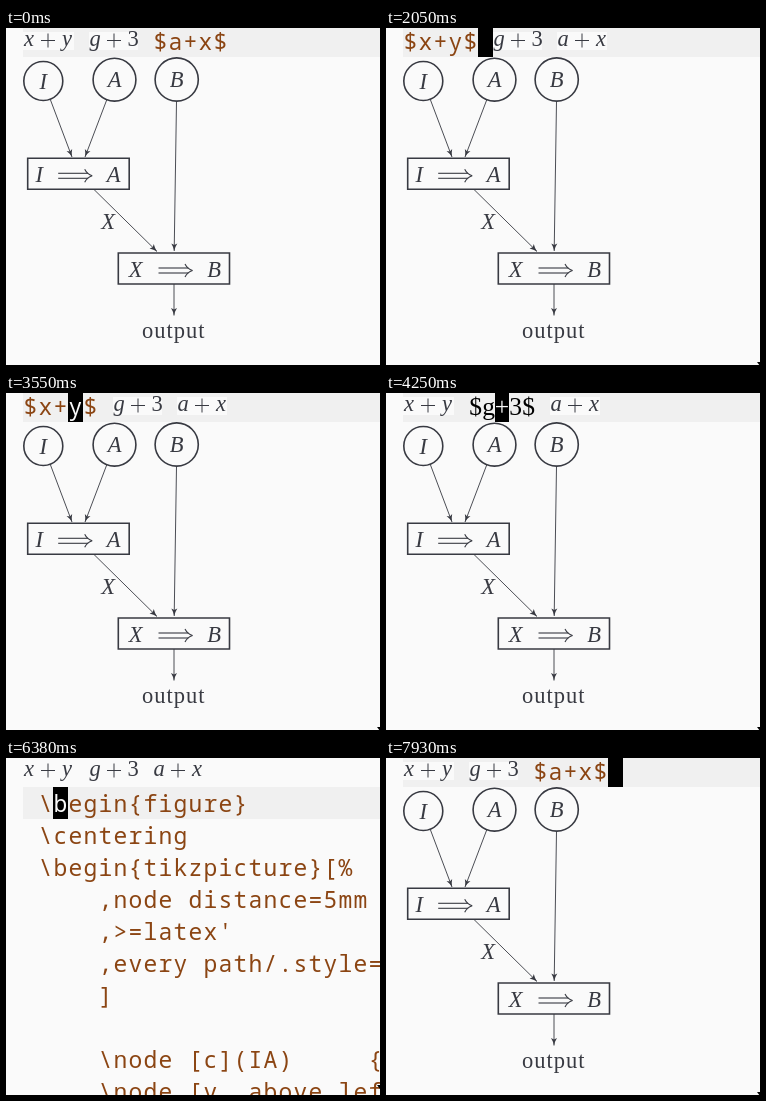
Animation of 374 by 337 pixels, one loop 8000 ms. Source, as an HTML page with a canvas:

```html
<!DOCTYPE html>
<html lang="en">
<head>
<meta charset="utf-8">
<style>
html, body { margin: 0; width: 100%; height: 100%; overflow: hidden; background: #fafafa; }
canvas { display: block; }
</style>
</head>
<body>
<canvas id="stage" width="374" height="337"></canvas>
<script>
const ctx = document.getElementById('stage').getContext('2d');
const LOOP = 8000, LEFT = 17, CELL = 15, ROW = 32;
const BG = '#fafafa', INK = '#383a42', CODE = '#8b4513', ACTIVE = '#f0f0f0';
const MONO = '300 23px "Noto Sans Mono", monospace';
const SERIF = '25.5px "Liberation Serif", serif';
const DIGIT = '22.5px "Liberation Serif", serif';
const MATH = 'italic ' + DIGIT;
const FORMULAS = [['x+y', 51], ['g+3', 49], ['a+x', 50]];
const FIGURE = 3, RENDER_LAG = 50;
const ABOVE = -1, NEXT_LINE = 18;
const LISTING = [
  '\\begin{figure}', '\\centering', '\\begin{tikzpicture}[%',
  '    ,node distance=5mm', "    ,>=latex'", '    ,every path/.style=', '    ]', '',
  '    \\node [c](IA)     {', '    \\node [v, above left'
];

// Turning points of the cursor [time, column]; it steps evenly between them.
// Each formula takes 6 columns, its trailing space included.
const KEYS = [
  [0, 12], [880, 11], [1420, 8], [2710, 0], [2930, ABOVE], [3110, 0], [4250, 8],
  [5460, 16], [5640, 17], [5820, NEXT_LINE], [6140, 19], [6380, 20], [6740, 22],
  [7280, 19], [7470, NEXT_LINE], [7880, 17], [LOOP, 17]
];

function cursorAt(t) {
  const i = KEYS.findIndex(k => k[0] > t);
  const [t0, c0] = KEYS[i - 1], [t1, c1] = KEYS[i];
  const steps = Math.floor(Math.abs(c1 - c0) * (t - t0) / (t1 - t0));
  return c0 + Math.sign(c1 - c0) * steps;
}

// The fragment under the cursor is shown as source, a moment after the move.
const openAt = t => Math.min(FIGURE, Math.floor(cursorAt(Math.max(0, t - RENDER_LAG)) / 6));

function box(x, y, w, h, color) {
  ctx.fillStyle = color;
  ctx.fillRect(x, y, w, h);
}

function write(text, x, y, font, color, align = 'left') {
  ctx.font = font;
  ctx.fillStyle = color;
  ctx.textAlign = align;
  ctx.fillText(text, x, y);
}

function stroke(width, path) {
  ctx.strokeStyle = INK;
  ctx.lineWidth = width;
  ctx.beginPath();
  path();
  ctx.stroke();
}

function line(x1, y1, x2, y2, width = 1) {
  stroke(width, () => { ctx.moveTo(x1, y1); ctx.lineTo(x2, y2); });
}

const letter = (s, x, y, font = MATH) => write(s, x, y, font, INK, 'center');

const caret = (x, row, w = CELL) => box(x, row * ROW - 3, w, ROW, '#000');

// Writes text cell by cell with a block cursor at index `at`; returns the end.
function source(text, x, row, at, serif = false) {
  for (const [i, ch] of [...text].entries()) {
    ctx.font = SERIF;
    const w = serif ? Math.round(ctx.measureText(ch).width) : CELL;
    if (i === at) caret(x, row, w);
    const color = i === at ? BG : serif ? '#000' : CODE;
    write(ch, x + w / 2, 22 + row * ROW, serif ? SERIF : MONO, color, 'center');
    x += w;
  }
  return x;
}

function formula(text, x, w) {
  box(x, 4, w, 18, BG);
  [...text].forEach((ch, i) => {
    const cx = x + 6 + 19 * i;
    if (ch === '+') {
      line(cx - 7, 12.5, cx + 7, 12.5);
      line(cx, 5.5, cx, 19.5);
    } else {
      letter(ch, cx, 18, ch === '3' ? DIGIT : MATH);
    }
  });
  return x + w;
}

function topLine(open, cursor) {
  let x = LEFT;
  FORMULAS.forEach(([text, w], i) => {
    const at = cursor - i * 6;
    x = open === i ? source(`$${text}$`, x, 0, at, i === 1) : formula(text, x, w);
    if (at === 5) caret(x, 0);
    x += CELL;
  });
}

function listing(cursor) {
  LISTING.forEach((text, i) => source(' ' + text, LEFT, i + 1, i ? -1 : cursor - NEXT_LINE));
}

function edge(x1, y1, x2, y2) {
  line(x1, y1, x2, y2, .9);
  ctx.save();
  ctx.translate(x2, y2);
  ctx.rotate(Math.atan2(y2 - y1, x2 - x1));
  ctx.fillStyle = INK;
  ctx.beginPath();
  ctx.moveTo(0, 0);
  ctx.quadraticCurveTo(-4, -.8, -7.5, -3);
  ctx.lineTo(-6, 0);
  ctx.lineTo(-7.5, 3);
  ctx.quadraticCurveTo(-4, .8, 0, 0);
  ctx.fill();
  ctx.restore();
}

function circle(name, x, y, r) {
  stroke(1.6, () => ctx.arc(x, y, r, 0, Math.PI * 2));
  letter(name, x, y + 7.5);
}

function rule(from, to, x, y, w) {
  const a = x + w - 71, c = y + 17.5;
  stroke(1.6, () => ctx.rect(x, y, w, 31));
  letter(from, a - 23 + 4 * (from === 'I'), y + 24);
  letter(to, x + w - 15.5, y + 24);
  for (const side of [-1, 1]) {
    line(a, c + side * 2.5, a + 30, c + side * 2.5, 1.1);
    stroke(1.1, () => {
      ctx.moveTo(a + 26.5, c + side * 6.5);
      ctx.quadraticCurveTo(a + 29, c + side * 1.5, a + 34, c);
    });
  }
}

function figure() {
  circle('I', 37.3, 53, 19.5);
  circle('A', 108.5, 51.7, 21.4);
  circle('B', 170.7, 51.5, 21.6);
  rule('I', 'A', 21.7, 130.3, 101.5);
  rule('X', 'B', 112.3, 225, 111.2);
  edge(44.3, 71.5, 66, 129);
  edge(100.7, 72, 79, 129);
  edge(88, 161.5, 151, 223.5);
  edge(170.5, 73.3, 168.2, 223);
  edge(168, 256, 168, 287.5);
  letter('X', 102, 201);
  ctx.letterSpacing = '1px';
  write('output', 136, 309.5, DIGIT, INK);
  ctx.letterSpacing = '0px';
}

function pointer(y) {
  ctx.fillStyle = '#000';
  ctx.beginPath();
  ctx.moveTo(371, y);
  ctx.lineTo(374, y);
  ctx.lineTo(374, y + 4);
  ctx.fill();
}

function draw(t) {
  const cursor = cursorAt(t), open = openAt(t);
  const expanded = open === FIGURE, below = cursor >= NEXT_LINE;
  box(0, 0, 374, 337, BG);
  if (cursor !== ABOVE) box(LEFT, below ? 29 : 0, 357, below ? ROW : 29, ACTIVE);
  if (expanded) listing(cursor);
  else figure();
  topLine(open, t < 130 ? ABOVE : cursor);
  if (t >= 880) pointer(expanded ? 327 : 334);
}

function tick(now) {
  draw(now % LOOP);
  requestAnimationFrame(tick);
}
requestAnimationFrame(tick);
</script>
</body>
</html>
```
